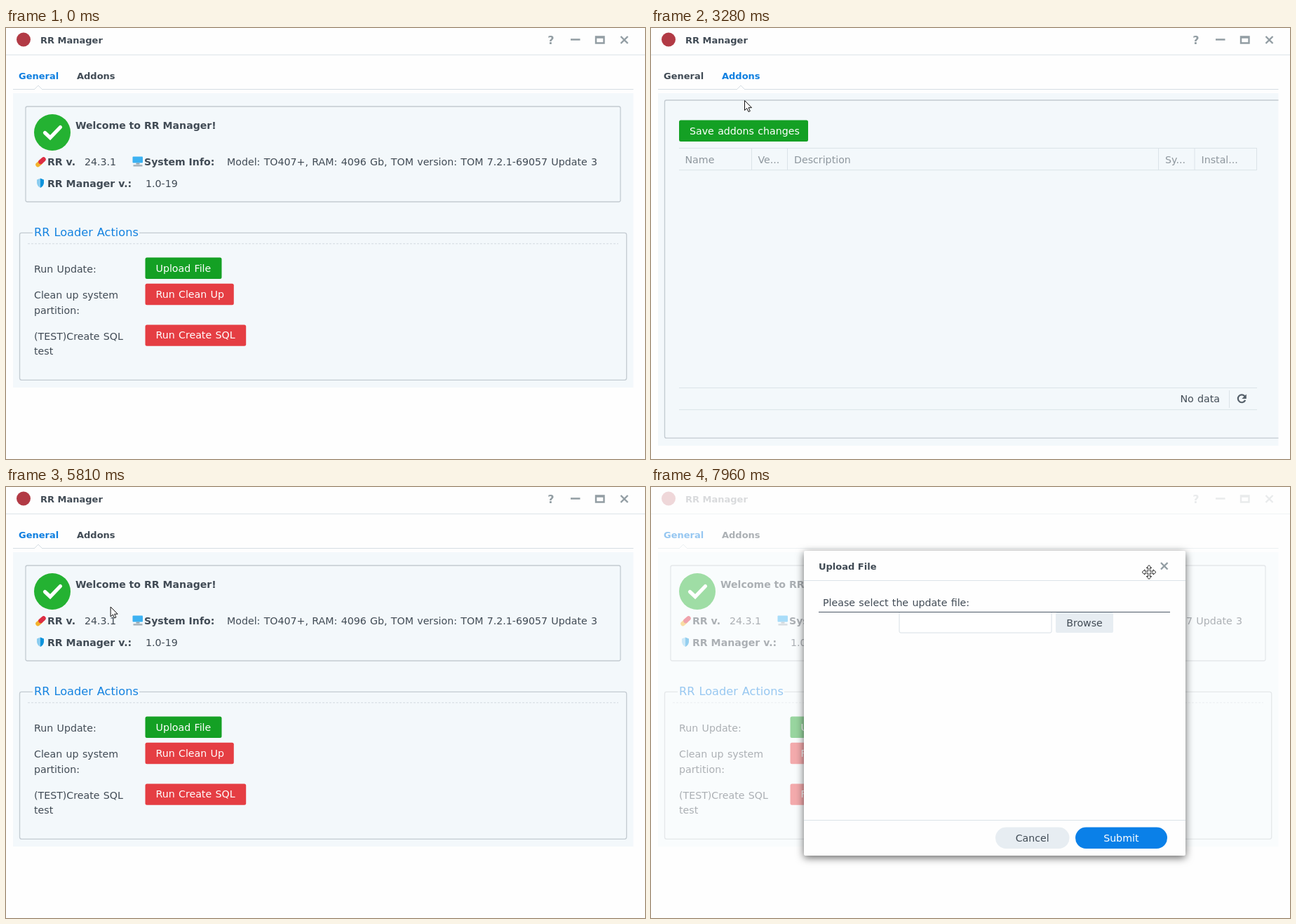
An HTML page that plays this animation: 911 by 615 pixels, repeating every 8 s.

```html
<!DOCTYPE html>
<html lang="en">
<head>
<meta charset="utf-8">
<title>RR Manager</title>
<style>
  html, body { margin: 0; width: 100%; height: 100%; overflow: hidden; background: #fefefe; }
  svg { display: block; }
  text { font: 14.2px "DejaVu Sans", sans-serif; word-spacing: .8px; fill: #414b55; white-space: pre; }
  .bold { font-weight: bold; font-size: 14.1px; word-spacing: 0; }
  .title { font-weight: bold; font-size: 13px; word-spacing: 0; }
  .legend { font-size: 16.2px; fill: #1583e0; }
  .head { fill: #8e979e; }
  .blue { fill: #0f7fe0; }
  .white { fill: #fff; }
  .mid { text-anchor: middle; }
  .end { text-anchor: end; }
  .line { stroke: #dbe3e8; fill: none; }
  .frame { stroke: #c3cbd1; stroke-width: 1.3; fill: none; }
  .grey { stroke: #929da3; stroke-width: 2.4; fill: none; }
</style>
</head>
<body>
<svg id="stage" width="911" height="615" viewBox="0 0 911 615"></svg>
<script>
const LOOP = 8000;
const GREEN = '#14a024', PRESSED = '#0d7a19', RED = '#e53e43', PANEL = '#f3f8fb';

const text = (x, y, s, cls = '', id = '') =>
  `<text x="${x}" y="${y}" class="${cls}"${id && ` id="${id}"`}>${s}</text>`;
const rect = (x, y, w, h, fill, r = 0, more = '') =>
  `<rect x="${x}" y="${y}" width="${w}" height="${h}" rx="${r}" fill="${fill}" ${more}/>`;
const path = (d, attrs) => `<path d="${d}" ${attrs}/>`;
const line = d => path(d, 'class="line"');
const group = (id, body, more = '') => `<g id="${id}" ${more}>${body}</g>`;
const button = (x, y, w, fill, label, id) =>
  rect(x, y, w, 30.4, fill, 2.5, `id="${id}"`) + text(x + 15, y + 20, label, 'white');

const titleBar = group('titleBar',
  '<circle cx="25" cy="16.5" r="10" fill="#b23a45"/>' +
  text(49, 21.5, 'RR Manager', 'title') +
  '<text x="777" y="22.5" class="mid" style="font-weight:bold;font-size:16px;fill:#929da3">?</text>' +
  path('M805 16.5H818.5M841 12.5H852.5V21.5H841ZM841 13.5H852.5M876.5 12L886.5 22M886.5 12L876.5 22', 'class="grey"'));

const tabs = text(18, 72.5, 'General', 'title', 'tabGeneral') + text(101, 72.5, 'Addons', 'title', 'tabAddons') +
  path('M10 87.5H894.5', 'class="line" style="stroke:#d5dde3"') +
  path('M-6 88L0 82L6 88', 'id="notch" fill="#fefefe" stroke="#d5dde3"');

const icons =
  '<circle cx="66" cy="149" r="26" fill="#24b232"/>' +
  path('M55.5 149.5L63 156.5L77.5 141.5', 'fill="none" stroke="#fff" stroke-width="5.2" stroke-linecap="round"') +
  path('M45.5 195L49.5 191.5', 'stroke="#f3b32e" stroke-width="6.5" stroke-linecap="round"') +
  path('M49.5 191L53.5 187.5', 'stroke="#dd2e44" stroke-width="6.5" stroke-linecap="round"') +
  rect(180.5, 183.5, 14.5, 9, '#3cb2f2', 1) + rect(185.5, 192.5, 5, 2, '#8da0ac') +
  rect(181.5, 195, 13, 2.6, '#a9b6bf') +
  path('M49 214.5L44 216.5V221Q44.5 226 49 228Z', 'fill="#8ccdf0"') +
  path('M49 214.5L54 216.5V221Q53.5 226 49 228Z', 'fill="#0d93dc"');

const general = group('general',
  rect(10, 93, 884.5, 420, PANEL) +
  rect(28, 112, 848, 136, 'none', 2.5, 'class="frame"') + icons +
  text(99, 144, 'Welcome to RR Manager!', 'bold') +
  text(59, 196, 'RR v.', 'bold') + text(112, 196, '24.3.1') +
  text(197, 196, 'System Info:', 'bold') +
  text(315, 196, 'Model: TO407+, RAM: 4096 Gb, TOM version: TOM 7.2.1-69057 Update 3') +
  text(59, 226.5, 'RR Manager v.:', 'bold') + text(199, 226.5, '1.0-19') +
  path('M38 292.3H22Q19.5 292.3 19.5 295V499.5Q19.5 502.3 22 502.3H882Q884.7 502.3 884.7 499.5V295Q884.7 292.3 882 292.3H190', 'class="frame"') +
  text(40, 297, 'RR Loader Actions', 'legend') +
  path('M31 307.8H873', 'stroke="#d3dbe0" stroke-dasharray="3 2"') +
  text(40, 348.5, 'Run Update:') +
  text(40, 386, 'Clean up system') + text(40, 407.5, 'partition:') +
  text(40, 444.5, '(TEST)Create SQL') + text(40, 466, 'test') +
  button(198.5, 327.5, 109, GREEN, 'Upload File', 'upload') +
  button(198.5, 364.8, 126.3, RED, 'Run Clean Up', 'clean') +
  button(198.5, 423.4, 143.7, RED, 'Run Create SQL', 'sql'));

// name, description, state: 1 installed, 0 not installed, 's' system
const addons = [
  ['tfjutil', 'A tool for working with some TFJ RAID controllers.', 0],
  ['photosfac...', 'This patch will ignore the GPU to enable face recognition in Veltroda ...', 1],
  ['i915le10th', 'Automatically replace the device ID of i915.ko(willowmere, lanternbay...', 0],
  ['acpid', 'ACPI Daemon that handles power button events, fixing power button ...', 1],
  ['codecpatch', 'This patch enables transcoding on Veltrodas TillOrchard Manager 6+...', 1],
  ['expands', 'Expanded miscellaneous, updated usb.map, ca-certificates.crt, etc.', 0],
  ['reboottolo...', 'Add a script to restart to RR in the TOM scheduled task, making it ea...', 1],
  ['eudev', 'eudev + kmod automatically loaded modules.', 's'],
  ['storagepa...', 'Change the storage panel disk display (default: RACK_24_Bay 1X8).', 0],
  ['addincards', 'Remove model restrictions from official Addin cards(K4P70, Q20H15-...', 0]
];

const mark = (state, y) => {
  if (state === 's') return path(`M736.5 ${y + 1}L740.5 ${y + 5}L748 ${y - 5}`, 'fill="none" stroke="#4d4892" stroke-width="3.4"');
  if (!state) return rect(784.5, y - 8, 12, 12, '#fff', 2, 'stroke="#767676" stroke-width="1.1"');
  return rect(784, y - 8.5, 13, 13, '#0b76f5', 2) +
    path(`M786.7 ${y - 2}L789.4 ${y + .8}L794.4 ${y - 5}`, 'fill="none" stroke="#fff" stroke-width="1.9"');
};
const row = ([name, about, state], i) => {
  const top = 203 + 31.4 * i, y = top + 15.7, base = y + 5.2;
  return text(48.5, base, name) + text(153, base, 1) + text(204, base, about) + mark(state, y) +
    line(`M40 ${top + 31.4}H863.5`);
};
const columns = (top, bottom) => line([143.5, 194.5, 723.5, 775, 863.5].map(x => `M${x} ${top}V${bottom}`).join(''));

const addonsPage = group('addons',
  rect(10, 93, 884.5, 503, PANEL) +
  path('M894.5 103H22Q19.5 103 19.5 105.5V582.5Q19.5 585.2 22 585.2H894.5', 'class="frame"') +
  button(40, 131.5, 184, GREEN, 'Save addons changes', 'save') +
  line('M40 171.5H863.5M40 202.7H863.5M40 513.5H864M40 544.7H864M824.5 517V542') + columns(171, 203) +
  [[48.5, 'Name'], [152.5, 'Ve...'], [204, 'Description'], [733, 'Sy...'], [784.5, 'Instal...']]
    .map(([x, s]) => text(x, 192.5, s, 'head')).join('') +
  group('rows', addons.map(row).join('') + columns(203, 513) + rect(853.7, 203, 8.3, 113.5, '#d3d8dc', 4),
    'clip-path="url(#tableClip)"') +
  text(811, 534, 'No data', 'end', 'count') +
  path('M846.6 525.6A5.4 5.4 0 1 0 847.2 531', 'fill="none" stroke="#55606a" stroke-width="2.2"') +
  path('M848.8 522.5V529H842.3Z', 'fill="#55606a"'));

const dialog = group('dialog',
  rect(0, 0, 911, 615, '#fff', 0, 'opacity=".56"') +
  rect(218, 91, 544, 435, '#fefefe', 2, 'style="filter:drop-shadow(0 3px 6px rgba(0,0,0,.6))"') +
  text(239, 117.5, 'Upload File', 'title') +
  path('M727 108L736.5 117.5M736.5 108L727 117.5', 'class="grey"') +
  line('M218 133.5H762M218 475.5H762') +
  path('M354 179V206Q354 208 356 208H569Q571 208 571 206V179', 'fill="#fff" stroke="#d8dfe5"') +
  rect(577, 179, 82, 29, '#e7edf2', 2) +
  path('M239 178.5H740', 'stroke="#4c5866" stroke-width="1.2"') +
  text(245, 170, 'Please select the update file:') +
  text(618, 198.7, 'Browse', 'mid') +
  rect(491, 485.5, 105.5, 30.5, '#e7edf2', 15.2) + text(543.7, 505.5, 'Cancel', 'mid') +
  rect(605, 485.5, 131, 30.5, '#0a80e8', 15.2) + text(670.3, 505.5, 'Submit', 'white mid'));

const cursors = group('cursor',
  path('M.5 .5V14.5L3.7 11.5L6 16.5L8.3 15.5L6 10.7H10.5Z', 'id="arrow" fill="#fff" stroke="#111"') +
  path('M-2 1Q0 -1.4 2 1V7Q4 6 5 7.7Q7 6.9 7.8 8.7Q9.6 8.4 9.6 10.5V14Q9.5 16.5 8 18.8H-.5Q-2.5 15.5 -5 12.2Q-5.5 9.8 -3.4 10.2L-2 11.7Z' +
    'M2 7V11M5 8V11M7.8 9V11.5', 'id="hand" fill="#fff" stroke="#111"') +
  path('M0 -10L3.6 -6H1.3V-1.3H6V-3.6L10 0L6 3.6V1.3H1.3V6H3.6L0 10L-3.6 6H-1.3V1.3H-6V3.6L-10 0L-6 -3.6V-1.3H-1.3V-6H-3.6Z',
    'id="cross" fill="#fff" stroke="#222"'));

document.getElementById('stage').innerHTML =
  '<defs><clipPath id="tableClip"><rect x="40" y="203" width="825" height="310.5"/></clipPath></defs>' +
  rect(0, 0, 911, 615, '#fefefe') + titleBar + line('M0 38.3H911') + general + addonsPage + tabs + dialog +
  '<circle id="click" r="13" fill="#ff0" fill-opacity=".55"/>' + cursors;

const el = id => document.getElementById(id);
const show = (id, on) => el(id).setAttribute('display', on ? 'inline' : 'none');

// start, end, number of steps, destination x, y
const moves = [
  [440, 440, 1, 845, 597], [506, 970, 8, 123, 57], [1230, 1510, 5, 129, 64], [1780, 1780, 1, 131.5, 63.5],
  [3080, 3280, 4, 133, 103], [3347, 3480, 3, 133, 100], [3870, 3940, 2, 133, 97],
  [4270, 4270, 1, 128.5, 85], [4338, 4608, 5, 67, 66.5],
  [5480, 6230, 12, 284, 343], [6300, 6370, 2, 279, 343.5],
  [7080, 7830, 12, 692, 149], [7900, 7900, 1, 703, 128], [7960, 7960, 1, 710, 121.5]
];
// start, end, centre x, y
const clicks = [[2180, 2360, 131, 63], [4676, 4880, 66.5, 67], [6570, 6700, 278.5, 343.5]];

function pointer(t) {
  let x = 845, y = 597;
  for (const [start, end, steps, toX, toY] of moves) {
    if (t < start) break;
    const pace = (end - start) / (steps - 1) || 1;
    const k = Math.min(1, (Math.floor((t - start) / pace + 1e-6) + 1) / steps);
    const e = k * k * (3 - 2 * k);
    x += (toX - x) * e;
    y += (toY - y) * e;
  }
  return [x, y];
}

function draw(t) {
  const [x, y] = pointer(t);
  const over = (l, top, r, b) => t >= 440 && x >= l && x <= r && y >= top && y <= b;
  const onAddons = t >= 2590 && t < 4760;
  const open = t >= 6700;
  const overGeneral = over(18, 55, 76, 82), overAddons = over(101, 55, 156, 82);
  const overUpload = !onAddons && over(198, 327, 308, 358);

  show('general', !onAddons);
  show('addons', onAddons);
  show('rows', t >= 3400);
  el('count').textContent = t >= 3400 ? '27 items' : 'No data';
  el('tabGeneral').setAttribute('class', 'title' + (!onAddons || overGeneral ? ' blue' : ''));
  el('tabAddons').setAttribute('class', 'title' + (onAddons || overAddons ? ' blue' : ''));
  el('notch').setAttribute('transform', `translate(${onAddons ? 128 : 46} 0)`);

  const dark = overUpload && t < 6840;
  el('upload').setAttribute('fill', dark ? PRESSED : GREEN);
  el('upload').setAttribute('stroke', dark && t >= 6570 ? '#07500f' : 'none');
  show('dialog', open);
  el('titleBar').setAttribute('opacity', open ? .45 : 1);

  const click = clicks.find(([start, end]) => t >= start && t < end);
  show('click', click);
  if (click) el('click').setAttribute('transform', `translate(${click[2]} ${click[3]})`);

  const hand = !open && (overUpload || (onAddons ? overGeneral : overAddons));
  const cross = open && over(218, 91, 762, 133);
  show('cursor', t >= 440);
  show('hand', hand);
  show('cross', cross);
  show('arrow', !hand && !cross);
  el('cursor').setAttribute('transform', `translate(${x} ${y})`);
}

const began = performance.now();
function tick() {
  draw((performance.now() - began) % LOOP);
  requestAnimationFrame(tick);
}
tick();
</script>
</body>
</html>
```
